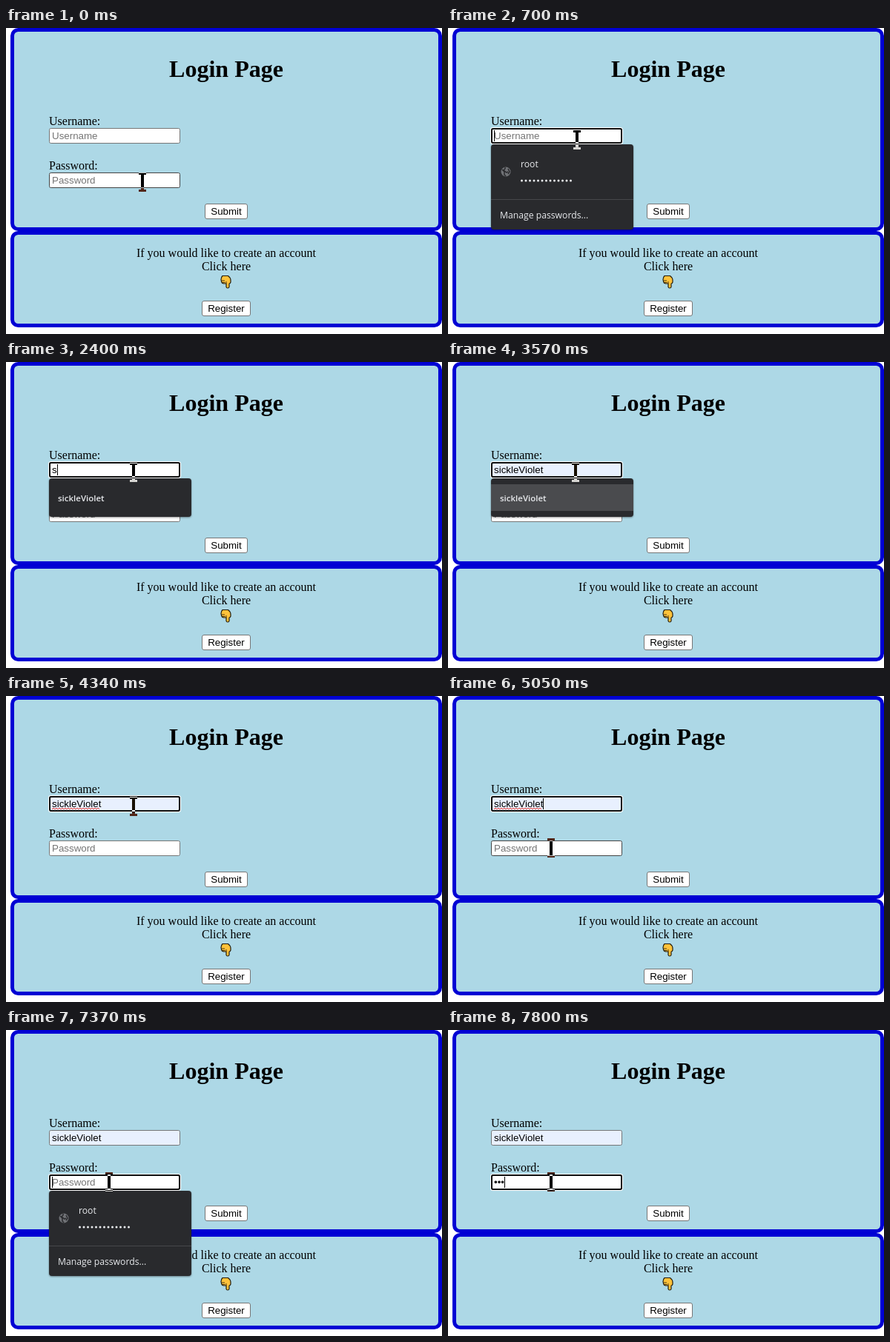
Write an HTML page that moves like this. It is 588 by 413 pixels and loops after 8 s.

```html
<!DOCTYPE html>
<html lang="en">
<head>
<meta charset="utf-8">
<title>Login Page</title>
<style>
html, body { margin: 0; width: 100%; height: 100%; overflow: hidden; background: #fff; }
svg { display: block; }
text { font: 16px "Liberation Serif", "Times New Roman", serif; white-space: pre; }
.mid { text-anchor: middle; }
.title { font-size: 32px; font-weight: bold; }
.panel { fill: lightblue; stroke: #0000d4; stroke-width: 5; }
.button rect { fill: #fff; stroke: #767676; }
.button text, .field text { font: 13.333px "Liberation Sans", Arial, sans-serif; }
.halo { fill: none; }
.box { fill: #fff; stroke: #767676; }
.ring { fill: none; }
.hover .box { stroke: #444; }
.fill .box { fill: #e8f0fe; }
.focus .halo { fill: #fff; }
.focus .ring { stroke: #101010; stroke-width: 2; }
.empty text { fill: #757575; }
.wave { fill: none; stroke: #e02020; stroke-width: .9; }
.popup { filter: drop-shadow(0 1px 1px rgba(0, 0, 0, .4)); }
.popup text { font: 12.2px "Open Sans", "Noto Sans", sans-serif; fill: #e8eaed; }
.popup .strong { font-size: 11.5px; font-weight: 600; }
.back { fill: #292a2d; }
#beam { fill: #fff; mix-blend-mode: difference; }
</style>
</head>
<body>
<svg width="588" height="413" viewBox="0 0 588 413">
  <rect class="panel" x="8.5" y="2.5" width="577" height="269" rx="8"/>
  <rect class="panel" x="8.5" y="276.5" width="577" height="125" rx="8"/>
  <text class="mid title" x="297" y="66">Login Page</text>
  <text x="58" y="131">Username:</text>
  <text x="58" y="191">Password:</text>
  <text class="mid" x="297" y="309">If you would like to create an account</text>
  <text class="mid" x="297" y="327">Click here</text>
  <path d="M292 334.5h7.5q3.5 2.5 3.5 6v2.500q-.5 2-2 2v4.500q-.3 1.500-2 1.500t-2-1.500v-4.500h-3q-3 0-3.500-3l-.5-2.500q0-3 2-5z"
    fill="#ffc23a" stroke="#221b0c" stroke-width="1.2" stroke-linejoin="round"/>
  <path d="M291 341h4M291.500 343.500h4M297 345v-3" fill="none" stroke="#221b0c" stroke-width=".8"/>
  <g class="button"><rect x="268.5" y="237.5" width="57" height="20" rx="2.5"/><text class="mid" x="297" y="252">Submit</text></g>
  <g class="button"><rect x="264.5" y="368.5" width="65" height="20" rx="2.5"/><text class="mid" x="297" y="383">Register</text></g>

  <g id="user" transform="translate(58 135)"></g>
  <g id="pass" transform="translate(58 195)"></g>

  <g id="logins" class="popup">
    <rect class="back" width="192" height="115" rx="4"/>
    <circle cx="20" cy="37" r="6.500" fill="#707276"/>
    <path d="M15 34l3 3v4l2 2M19 31v2l-2 2 4 3 2-1M23 33l2 4-2 3" fill="none" stroke="#292a2d" stroke-width="1.500"/>
    <text x="40" y="31">root</text>
    <path d="M41.500 49h67" stroke="#e8eaed" stroke-width="3" stroke-linecap="round" stroke-dasharray="0 5.5"/>
    <path d="M0 74.500h192" stroke="#47484b"/>
    <text x="12" y="100">Manage passwords...</text>
  </g>
  <g id="hint" class="popup" transform="translate(58 157)">
    <rect class="back" width="192" height="52" rx="4"/>
    <rect id="row" y="8" width="192" height="36" fill="#4a4b4e"/>
    <text id="hintText" class="strong" x="12" y="31"></text>
  </g>
  <path id="beam" d="M-5-13h10v3h-3v20h3v3h-10v-3h3v-20h-3z"/>
  <path id="arrow" d="M.5.5v25l6-5 4 9 4-2-4-8h7z" fill="#fff" stroke="#000"/>
</svg>
<script>
const LOOP = 8000, NAME = 'sickleViolet';
const $ = id => document.getElementById(id);
const show = (el, on) => el.style.display = on ? '' : 'none';
const during = (t, ...spans) => spans.some(([a, b]) => t >= a && t < b);
const latest = (t, steps) => steps.filter(s => s[0] <= t).pop();

const typedUser = [[0, ''], [2270, 's'], [2550, NAME.slice(0, 2)], [2700, NAME.slice(0, 3)], [3570, NAME]];
const typedPass = [[0, ''], [7520, '•'], [7650, '••'], [7800, '•••']];
// time, x, y, and whether the pointer is an arrow
const pointer = [
  [0, 184, 208], [150, 181, 201], [280, 178, 177, true], [430, 174, 151],
  [1540, 173, 150], [1690, 172, 149], [4490, 167, 143], [4620, 142, 169, true],
  [4770, 145, 208], [4920, 142, 211], [5050, 139, 205]
];

function makeField(id, placeholder) {
  const root = $(id);
  root.innerHTML = `<rect class="halo" x="-1" y="-1" width="179" height="23" rx="3.5"/>
    <rect class="box" x=".5" y=".5" width="176" height="20" rx="2"/>
    <rect class="ring" x="1" y="1" width="175" height="19" rx="2"/>
    <text x="4" y="15"></text>
    <path class="wave" d="M4 18${'l2-2 2 2'.repeat(16)}"/>
    <rect class="caret" y="3" width="1" height="15"/>`;
  const [text, wave, caret] = ['text', '.wave', '.caret'].map(s => root.querySelector(s));
  return (value, { focus, hover, fill, misspelt, blink }) => {
    const flags = { field: true, focus, hover, fill, empty: !value };
    root.setAttribute('class', Object.keys(flags).filter(k => flags[k]).join(' '));
    text.textContent = value || placeholder;
    show(wave, misspelt);
    show(caret, blink);
    caret.setAttribute('x', Math.round(4 + (value ? text.getComputedTextLength() : 0)));
  };
}

const drawUser = makeField('user', 'Username');
const drawPass = makeField('pass', 'Password');
$('hintText').textContent = NAME;

function frame(now) {
  const t = now % LOOP;
  drawUser(latest(t, typedUser)[1], {
    focus: during(t, [700, 5330]),
    hover: during(t, [430, 700]),
    fill: t >= 3570,
    misspelt: during(t, [3870, 5330]),
    blink: during(t, [700, 1260], [1690, 3290], [3870, 4340], [4920, 5330])
  });
  drawPass(latest(t, typedPass)[1], {
    focus: t >= 5330,
    hover: during(t, [0, 280], [4920, 5330]),
    blink: during(t, [5330, 5760], [6350, 6940], [7370, LOOP])
  });

  show($('logins'), during(t, [700, 2270], [5330, 7520]));
  $('logins').setAttribute('transform', `translate(58 ${t < 5330 ? 157 : 217})`);
  show($('hint'), during(t, [2400, 3870]));
  show($('row'), t >= 3570);

  const [, x, y, isArrow] = latest(t, pointer);
  show($('beam'), !isArrow);
  show($('arrow'), isArrow);
  $(isArrow ? 'arrow' : 'beam').setAttribute('transform', `translate(${x} ${y})`);
  requestAnimationFrame(frame);
}
requestAnimationFrame(frame);
</script>
</body>
</html>
```
